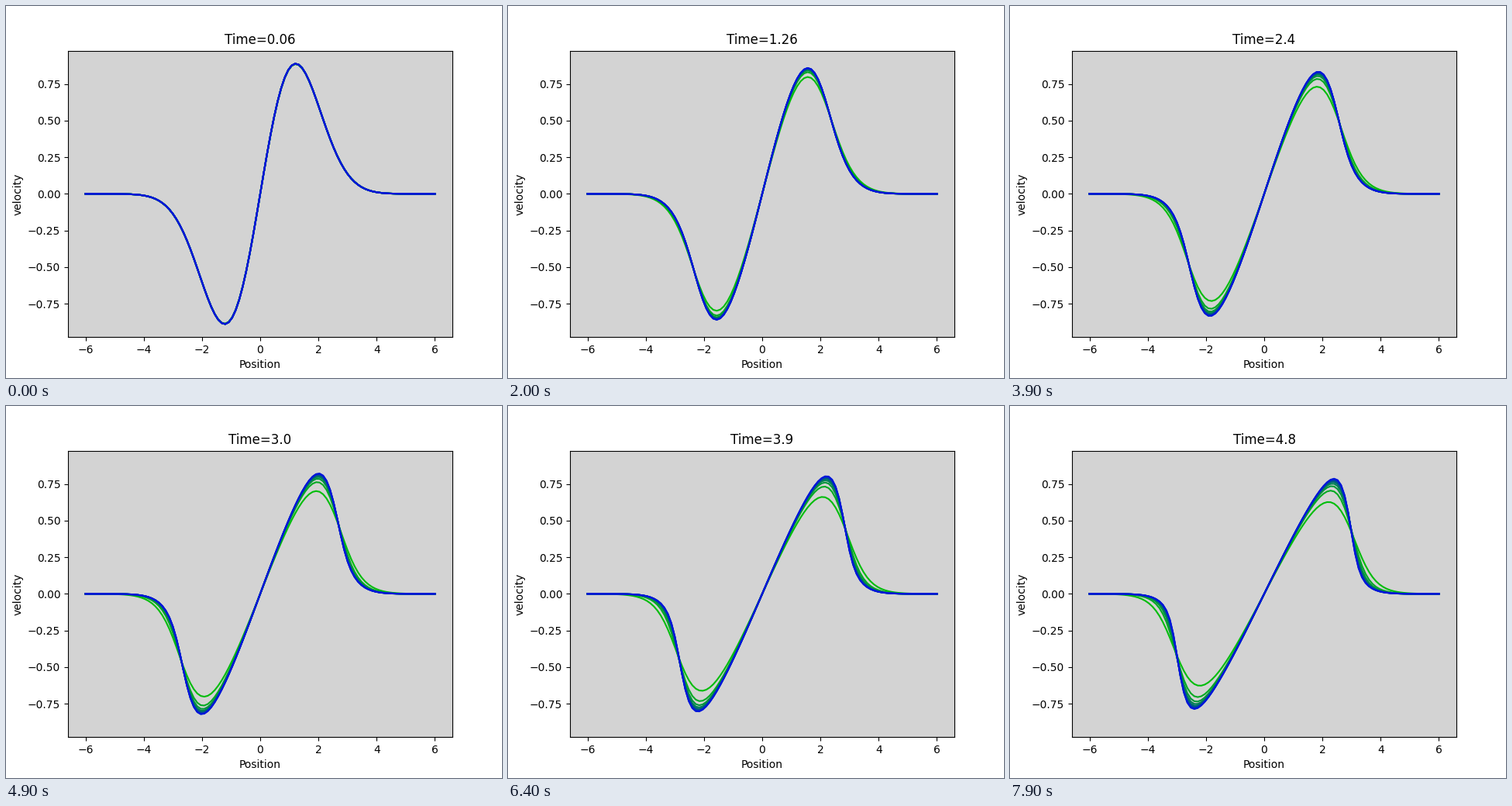
Recreate the animation shown at these times as a matplotlib script. Size 640 by 480 pixels, loop 8000 ms.

```python
import numpy as np
import matplotlib.pyplot as plt
from matplotlib.animation import FuncAnimation

FRAMES, INTERVAL = 80, 100
CURVES = 10
DT, TIME_STEP = 0.02, 0.06

x = np.linspace(-6, 6, 101)
dx = x[1] - x[0]
start = np.exp(-(x - 1)**2 / 2) - np.exp(-(x + 1)**2 / 2)
mix = np.linspace(0, 1, CURVES)
viscosity = 0.15 / np.arange(1, CURVES + 1)[:, None]


def advance(u):
    """One upwind step of the viscous Burgers equation."""
    left, mid, right = u[:, :-2], u[:, 1:-1], u[:, 2:]
    slope = np.where(mid > 0, mid - left, right - mid) / dx
    bend = (right - 2 * mid + left) / dx**2
    new = u.copy()
    new[:, 1:-1] += DT * (viscosity * bend - mid * slope)
    return new


def solve():
    u = np.tile(start, (CURVES, 1))
    states = []
    for _ in range(FRAMES):
        u = advance(u)
        states.append(u)
    return np.array(states)


states = solve()
limit = 1.1 * states.max()

fig, ax = plt.subplots(figsize=(6.4, 4.8), dpi=100)
ax.set_facecolor("lightgray")
ax.set_xlim(-6.6, 6.6)
ax.set_ylim(-limit, limit)
ax.set_xlabel("Position")
ax.set_ylabel("velocity")
title = ax.set_title("")
lines = [
    ax.plot(x, start, color=(0, 0.74 - 0.66 * m, 0.04 + 0.82 * m))[0] for m in mix
]


def draw(i):
    for line, u in zip(lines, states[i]):
        line.set_ydata(u)
    title.set_text(f"Time={round((i + 1) * TIME_STEP, 2)}")
    return [*lines, title]


anim = FuncAnimation(fig, draw, frames=FRAMES, interval=INTERVAL,
                     repeat=True, repeat_delay=0, blit=False)
plt.show()
```
